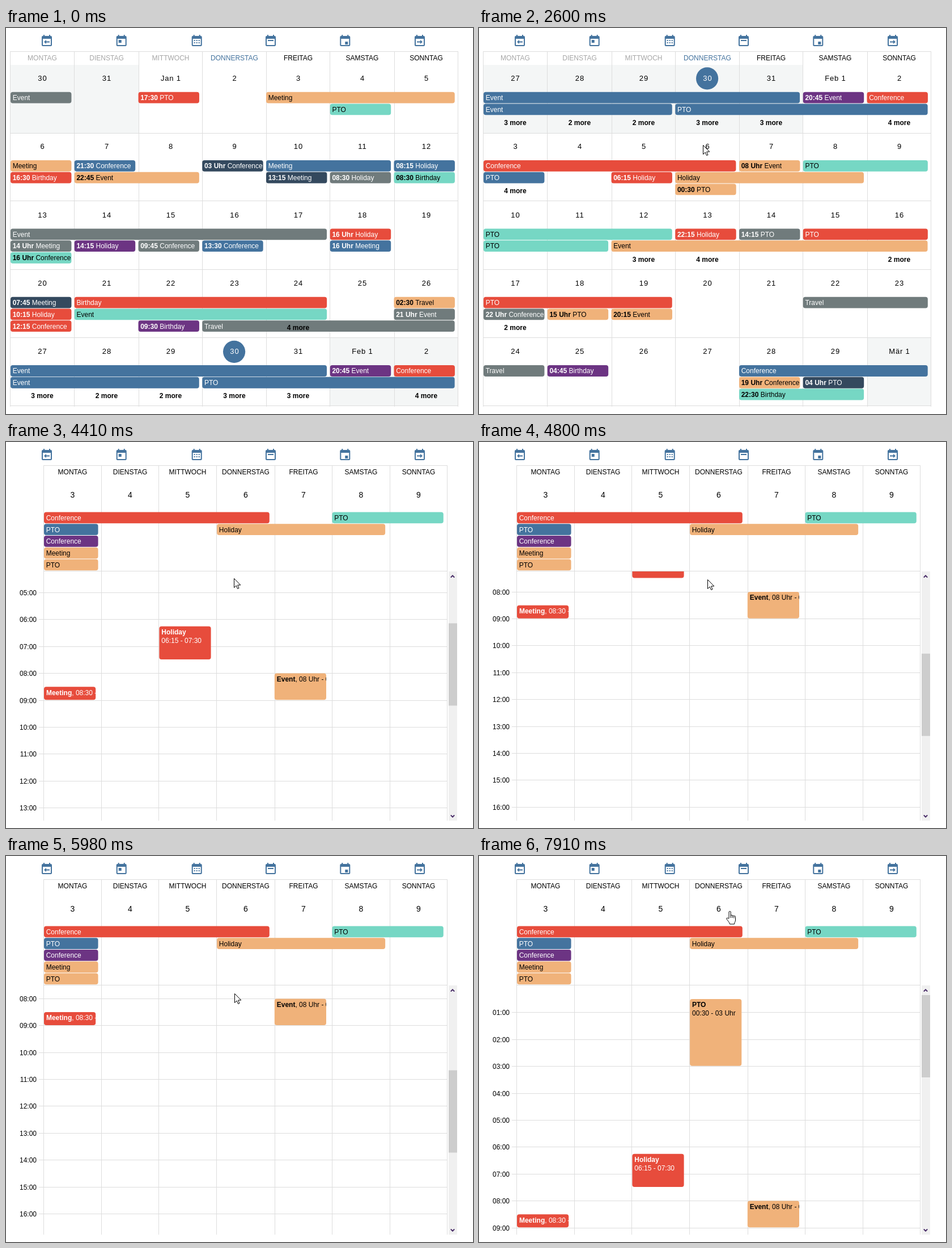
Animation, 824 px wide and 680 px high, one loop 7990 ms. Source, as an HTML page with a canvas:

```html
<!DOCTYPE html>
<html lang="de">
<head>
<meta charset="utf-8">
<title>Kalender</title>
<style>
html, body { margin: 0; width: 100%; height: 100%; overflow: hidden; background: #fff; }
canvas { display: block; }
</style>
</head>
<body>
<canvas id="stage" width="824" height="680"></canvas>
<script>
const LOOP = 7990;
const ctx = document.getElementById('stage').getContext('2d');
const BLUE = '#44739e', LINE = '#dddddd', SHADE = '#f4f6f6';
const FONT = '"Liberation Sans", Arial, sans-serif';
const COLORS = {
  r: '#e74c3c', o: '#f0b27a', t: '#76d7c4', b: BLUE,
  d: '#34495e', g: '#707b7c', p: '#6c3483'
};
const DAYS = ['MONTAG', 'DIENSTAG', 'MITTWOCH', 'DONNERSTAG', 'FREITAG', 'SAMSTAG', 'SONNTAG'];
const MONTHS = ['Jan', 'Feb', 'Mär'];

// Events: start column, colour, number of days, text
const january = {
  month: 0, start: new Date(2019, 11, 30),
  rows: [
    ['0g1 Event', '2r1 17:30 PTO', '4o3 Meeting', '5t1 PTO'],
    ['0o1 Meeting', '0r1 16:30 Birthday', '1b1 21:30 Conference', '1o2 22:45 Event',
     '3d1 03 Uhr Conference', '4b2 Meeting', '4d1 13:15 Meeting', '5g1 08:30 Holiday',
     '6b1 08:15 Holiday', '6t1 08:30 Birthday'],
    ['0g5 Event', '0g1 14 Uhr Meeting', '0t1 16 Uhr Conference', '1p1 14:15 Holiday',
     '2g1 09:45 Conference', '3b1 13:30 Conference', '5r1 16 Uhr Holiday', '5b1 16 Uhr Meeting'],
    ['0d1 07:45 Meeting', '0r1 10:15 Holiday', '0r1 12:15 Conference', '1r4 Birthday', '1t4 Event',
     '2p1 09:30 Birthday', '3g4 Travel', '6o1 02:30 Travel', '6g1 21 Uhr Event'],
    ['0b5 Event', '0b3 Event', '3b4 PTO', '5p1 20:45 Event', '6r1 Conference']
  ],
  more: ['', '', '', '0000400', '3223304']
};
const february = {
  month: 1, start: new Date(2020, 0, 27),
  rows: [
    january.rows[4],
    ['0r4 Conference', '0b1 PTO', '2r1 06:15 Holiday', '3o3 Holiday', '3o1 00:30 PTO',
     '4o1 08 Uhr Event', '5t2 PTO'],
    ['0t3 PTO', '0t2 PTO', '2o5 Event', '3r1 22:15 Holiday', '4g1 14:15 PTO', '5r2 PTO'],
    ['0r3 PTO', '0g1 22 Uhr Conference', '1o1 15 Uhr PTO', '2o1 20:15 Event', '5g2 Travel'],
    ['0g1 Travel', '1p1 04:45 Birthday', '4b3 Conference', '4o1 19 Uhr Conference',
     '5d1 04 Uhr PTO', '4t2 22:30 Birthday']
  ],
  more: ['3223304', '4000000', '0034002', '2000000', '']
};
const allDay = ['0r4 Conference', '0b1 PTO', '0p1 Conference', '0o1 Meeting', '0o1 PTO',
  '3o3 Holiday', '5t2 PTO'];
// Column, from hour, to hour, colour, title, time
const timed = [
  [3, 0.5, 3, 'o', 'PTO', '00:30 - 03 Uhr'],
  [2, 6.25, 7.5, 'r', 'Holiday', '06:15 - 07:30'],
  [4, 8, 9, 'o', 'Event', ', 08 Uhr - 09 Uhr'],
  [0, 8.5, 9, 'r', 'Meeting', ', 08:30 - 09 Uhr']
];

const monthX = [7, 120, 234, 346, 459, 571, 685, 797];
const weekX = [66, 168, 269, 371, 474, 575, 677, 778];
const mid = (xs, i) => (xs[i] + xs[i + 1] + 1) / 2;
const monthEventX = col => 8 + col * 112.75;
const weekEventX = col => 67 + col * 101.7;

function rect(x, y, w, h, color) {
  ctx.fillStyle = color;
  ctx.fillRect(x, y, w, h);
}

function text(s, x, y, { color = '#000', bold = false, size = 12, align = 'left', gap = 0 } = {}) {
  ctx.font = `${bold ? 'bold ' : ''}${size}px ${FONT}`;
  ctx.letterSpacing = gap + 'px';
  ctx.textAlign = align;
  ctx.fillStyle = color;
  ctx.fillText(s, x, y);
  return ctx.measureText(s).width;
}

// Rounded box that clips the text drawn by label(textColor)
function box(x, y, w, h, key, label) {
  ctx.save();
  ctx.beginPath();
  ctx.roundRect(x, y, w, h, 4);
  ctx.fillStyle = COLORS[key];
  ctx.fill();
  ctx.clip();
  label('ot'.includes(key) ? '#000' : '#fff');
  ctx.restore();
}

// Stacks each event in the first free slot of its columns
function drawEvents(list, eventX, top, pitch) {
  const used = new Set();
  for (const item of list) {
    const col = +item[0], key = item[1], span = +item[2];
    const cells = [...Array(span).keys()].map(i => col + i);
    let slot = 0;
    while (cells.some(c => used.has(slot * 7 + c))) slot++;
    cells.forEach(c => used.add(slot * 7 + c));
    const x = eventX(col), y = top + slot * 20.75;
    const [, time = '', title] = item.slice(4).match(/^(\d\d(?::\d\d| Uhr) )?(.*)/);
    box(x, y - 0.3, span * pitch - 5.2, 19.8, key, color => {
      const base = Math.round(y + 14);
      const w = time ? text(time, x + 3.7, base, { color, bold: true }) : 0;
      text(title, x + 3.7 + w, base, { color });
    });
  }
}

function drawMonth({ month, start, rows, more }) {
  const rowY = r => 65 + r * 120.35;
  const dates = [...Array(35).keys()].map(i =>
    new Date(start.getFullYear(), start.getMonth(), start.getDate() + i));
  dates.forEach((d, i) => {
    const c = i % 7, y = Math.round(rowY(i / 7 | 0));
    if (d.getMonth() !== month) rect(monthX[c], y, monthX[c + 1] - monthX[c], 120, SHADE);
  });
  monthX.forEach(x => rect(x, 42, 1, 625, LINE));
  rect(7, 41, 791, 1, LINE);
  for (let r = 1; r < 6; r++) rect(7, Math.floor(rowY(r)) - 1 + (r < 2), 791, 1, LINE);
  DAYS.forEach((s, i) => text(s, mid(monthX, i), 57,
    { align: 'center', color: i < 3 ? '#a6a6a6' : i === 3 ? BLUE : '#000' }));
  dates.forEach((d, i) => {
    const x = mid(monthX, i % 7), y = rowY(i / 7 | 0) + 23.7, n = d.getDate();
    const today = d.getMonth() === 0 && n === 30;
    if (today) {
      ctx.fillStyle = BLUE;
      ctx.beginPath();
      ctx.arc(x - 0.4, y + 0.2, 19.6, 0, 7);
      ctx.fill();
    }
    text(n === 1 ? MONTHS[d.getMonth()] + ' 1' : n, x + 0.4, Math.round(y + 4.3),
      { align: 'center', size: 13, gap: 0.8, color: today ? '#fff' : '#000' });
  });
  rows.forEach((list, r) => {
    drawEvents(list, monthEventX, rowY(r) + 48, 112.65);
    [...more[r]].forEach((n, i) => {
      if (+n) text(n + ' more', mid(monthX, i), Math.round(rowY(r) + 106), { align: 'center', bold: true });
    });
  });
}

function chevron(y, dir) {
  ctx.strokeStyle = '#432663';
  ctx.lineWidth = 2;
  ctx.beginPath();
  ctx.moveTo(784.8, y + 1.6 * dir);
  ctx.lineTo(788, y - 1.6 * dir);
  ctx.lineTo(791.2, y + 1.6 * dir);
  ctx.stroke();
}

function drawWeek(scroll) {
  const hourY = h => 228.4 + h * 47.4 - scroll;
  rect(66, 41, 713, 1, LINE);
  weekX.forEach(x => rect(x, 42, 1, 625, LINE));
  ctx.save();
  ctx.beginPath();
  ctx.rect(0, 228, 780, 439);
  ctx.clip();
  for (let h = 1; h < 24; h++) {
    const y = Math.floor(hourY(h));
    rect(58, y, 720, 1, LINE);
    text(String(h).padStart(2, '0') + ':00', 54, y + 5, { align: 'right' });
  }
  for (const [col, from, to, key, title, time] of timed) {
    const x = weekEventX(col), y = hourY(from), short = to - from <= 1;
    box(x, y, 91.2, (to - from) * 47.4 - 0.8, key, color => {
      const base = Math.round(y + 14.3);
      const w = text(title, x + 3.9, base, { color, bold: true });
      text(time, x + 3.9 + (short ? w : 0), base + (short ? 0 : 15), { color });
    });
  }
  ctx.restore();
  rect(66, 227, 713, 1, LINE);
  DAYS.forEach((s, i) => {
    text(s, mid(weekX, i), 57, { align: 'center' });
    text(i + 3, mid(weekX, i), 98, { align: 'center', size: 14 });
  });
  drawEvents(allDay, weekEventX, 123.8, 100.75);
  rect(781, 228, 15, 439, '#f0f0f0');
  rect(781, 245 + scroll * 0.372, 15, 145, '#cdcdcd');
  chevron(237, 1);
  chevron(659, -1);
}

const FRAME = 'M19 3h-1V1h-2v2H8V1H6v2H5c-1.1 0-2 .9-2 2v14c0 1.1.9 2 2 2h14c1.1 0 2-.9 2-2V5c0-1.1-.9-2-2-2zm0 16H5V8h14v11z';
const icons = [
  [72, 'M11 10v2.5h6v2h-6V17l-4-3.5z'],
  [203.7, 'M7 10h5v5H7z'],
  [336.7, 'M7 10h2v2H7zM11 10h2v2h-2zM15 10h2v2h-2zM7 14h2v2H7zM11 14h2v2h-2zM15 14h2v2h-2z'],
  [467, 'M7 10h10v2H7z'],
  [598.3, 'M12 13h5v5h-5z'],
  [730, 'M13 10v2.5H7v2h6V17l4-3.5z']
].map(([x, inner]) => [x, new Path2D(FRAME + inner)]);

function drawIcons() {
  for (const [x, path] of icons) {
    ctx.save();
    ctx.translate(x - 12, 11);
    ctx.fillStyle = BLUE;
    ctx.fill(path);
    ctx.restore();
  }
}

const arrow = new Path2D('M.5.5V16.5L4.2 13L6.6 18.5L9 17.5L6.7 12H11.8z');
const hand = new Path2D('M5 13V2a1.6 1.6 0 0 1 3.2 0V8a1.5 1.5 0 0 1 2.9 .6a1.5 1.5 0 0 1 2.8 .7a1.4 1.4 0 0 1 2.6 1V16c0 3-2 4-2 7H6.5C6 20 3 17 1 14.2C0 12.5 2 11.3 3.2 12.6z');
const knuckles = new Path2D('M8.2 8v4M11.1 8.6V12M13.9 9.3v3.2');

// Time, x, y of the tip, shape (a arrow, h hand, empty hidden)
const pointer = [
  [0, 606, 652, ''], [70, 606, 652, 'a'], [149, 606, 652, 'a'], [150, 703, 143, 'a'],
  [240, 703, 143, ''], [930, 724, 18, 'h'], [990, 730, 12, 'h'], [1220, 731, 14, 'h'],
  [1690, 731, 14, 'h'], [1760, 728, 8, 'a'], [2050, 560, 110, 'a'], [2250, 410, 220, 'a'],
  [2370, 393, 207, 'h'], [2599, 393, 207, 'h'], [2600, 395, 206, 'a'], [3780, 395, 206, 'a'],
  [4300, 402, 240, 'a'], [4500, 402, 240, 'a'], [4570, 403, 242, 'a'], [6440, 403, 242, 'a'],
  [6520, 402, 215, 'a'], [6600, 356, 99, 'a'], [6675, 356, 99, 'a'], [6680, 340, 40, 'h'],
  [6840, 323, 20, 'h'], [6950, 332, 5, 'h'], [7060, 341, 8, 'h'], [7130, 341, 8, 'h'],
  [7210, 350, 12, 'h'], [7400, 440, 30, 'a'], [7600, 512, 60, 'a'], [7770, 480, 101, 'a'],
  [7910, 443, 97, 'h'], [LOOP, 443, 97, 'h']
];
const scrolling = [
  [0, 0], [3780, 0], [4010, 100], [4100, 100], [4330, 200], [4600, 200], [4880, 400],
  [5040, 400], [5335, 551], [5420, 551], [5490, 600], [5660, 600], [6450, 0], [LOOP, 0]
];

// Linear interpolation between keys; the shape holds until the next key
function at(keys, t) {
  const i = keys.findIndex(k => k[0] > t);
  const a = keys[i - 1], b = keys[i], f = (t - a[0]) / (b[0] - a[0]);
  return a.map((v, n) => typeof v === 'number' ? v + (b[n] - v) * f : v);
}

function drawPointer(t) {
  const [, x, y, shape] = at(pointer, t);
  if (!shape) return;
  const path = shape === 'h' ? hand : arrow;
  ctx.save();
  ctx.translate(Math.round(x) - (shape === 'h' ? 7 : 0), Math.round(y));
  ctx.fillStyle = '#fff';
  ctx.strokeStyle = '#000';
  ctx.lineWidth = 1;
  ctx.fill(path);
  ctx.stroke(path);
  if (shape === 'h') ctx.stroke(knuckles);
  if (t >= 3610 && t < 3780) {
    ctx.beginPath();
    ctx.arc(14, 1, 5.8, 0, 7);
    ctx.fill();
    ctx.strokeStyle = '#2095ea';
    ctx.lineWidth = 3.8;
    ctx.stroke();
  }
  ctx.restore();
}

function draw() {
  const t = performance.now() % LOOP;
  rect(0, 0, 824, 680, '#fff');
  if (t >= 1220 && t < 1530) {
    ctx.fillStyle = '#e3eaee';
    ctx.beginPath();
    ctx.roundRect(665, 5, 131.5, 36, 2);
    ctx.fill();
  }
  drawIcons();
  if (t < 1300) drawMonth(january);
  else if (t < 2920) drawMonth(february);
  else drawWeek(at(scrolling, t)[1]);
  drawPointer(t);
  requestAnimationFrame(draw);
}
draw();
</script>
</body>
</html>
```
